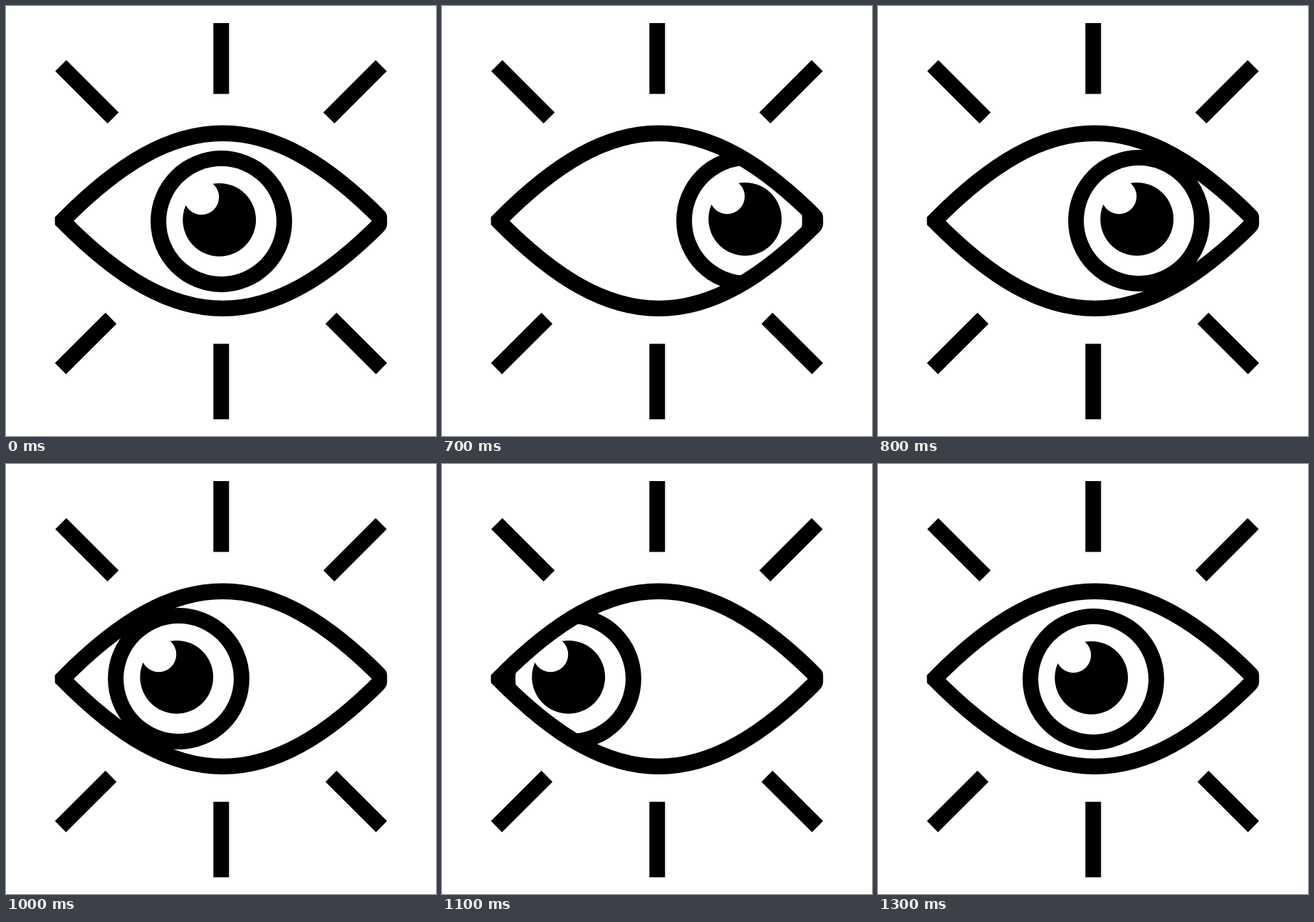
Animation of 604x604 px, one loop 1.5 s. Source, as an HTML page with a canvas:

```html
<!DOCTYPE html>
<html lang="en">
<head>
<meta charset="utf-8">
<title>Looking eye</title>
<style>
  html, body { margin: 0; width: 100%; height: 100%; overflow: hidden; background: #fff; }
  canvas { display: block; width: 604px; height: 604px; }
</style>
</head>
<body>
<canvas id="stage" width="604" height="604"></canvas>
<script>
const ctx = document.getElementById('stage').getContext('2d');
const SIZE = 604, MID = 302;
const LOOP = 1500, HOLD = 600, STEP = 100, GLANCES = 8;

// Middle line of the eyelids
const lid = new Path2D(
  'M79.2 301.8 C160 220 231 178.8 304.5 178.8 S449 220 529.8 301.8' +
  'C449 383.6 378 424.9 304.5 424.9 S160 383.6 79.2 301.8 Z');
// Blunt left corner, rounded right corner
const lidLimits = new Path2D(
  'M68.7 150 H530 V286 Q535.3 291 535.3 297 V306 Q535.3 312 530 317.5 V450 H68.7 Z');

function disc(x, y, r, color) {
  ctx.fillStyle = color;
  ctx.beginPath();
  ctx.arc(x, y, r, 0, Math.PI * 2);
  ctx.fill();
}

function ray(x1, y1, x2, y2) {
  ctx.beginPath();
  ctx.moveTo(x1, y1);
  ctx.lineTo(x2, y2);
  ctx.stroke();
}

function drawRays() {
  ctx.lineWidth = 22;
  ray(302.3, 24, 302.3, 123.4);
  ray(302.3, 474.6, 302.3, 580.6);
  for (const side of [-1, 1]) {
    ray(MID + side * 225, 83.7, MID + side * 151.5, 157.3);
    ray(MID + side * 154.5, 438.6, MID + side * 225.5, 509.4);
  }
}

function drawIris(x, y) {
  ctx.save();
  ctx.clip(lid);
  disc(x, y, 99.4, '#000');
  disc(x, y, 77.4, '#fff');
  disc(x - 2.8, y - 2.2, 51.4, '#000');
  disc(x - 28, y - 34, 24.7, '#fff');
  ctx.restore();
}

function drawLid() {
  ctx.save();
  ctx.clip(lidLimits);
  ctx.lineWidth = 22.4;
  ctx.stroke(lid);
  ctx.restore();
}

// Steps right, back, left and back: 0, 1, 2, 1, 0, -1, -2, -1, 0
function glance(t) {
  const step = Math.min(GLANCES, Math.max(0, Math.floor((t - HOLD) / STEP) + 1));
  return Math.round(2 * Math.sin(step / GLANCES * Math.PI * 2));
}

function draw() {
  const look = glance(performance.now() % LOOP);
  ctx.fillStyle = '#fff';
  ctx.fillRect(0, 0, SIZE, SIZE);
  ctx.strokeStyle = '#000';
  drawRays();
  if (look) drawIris(304.5 + 62 * look, 301.5);
  else drawIris(302.5, 302.5);
  drawLid();
  requestAnimationFrame(draw);
}
draw();
</script>
</body>
</html>
```
